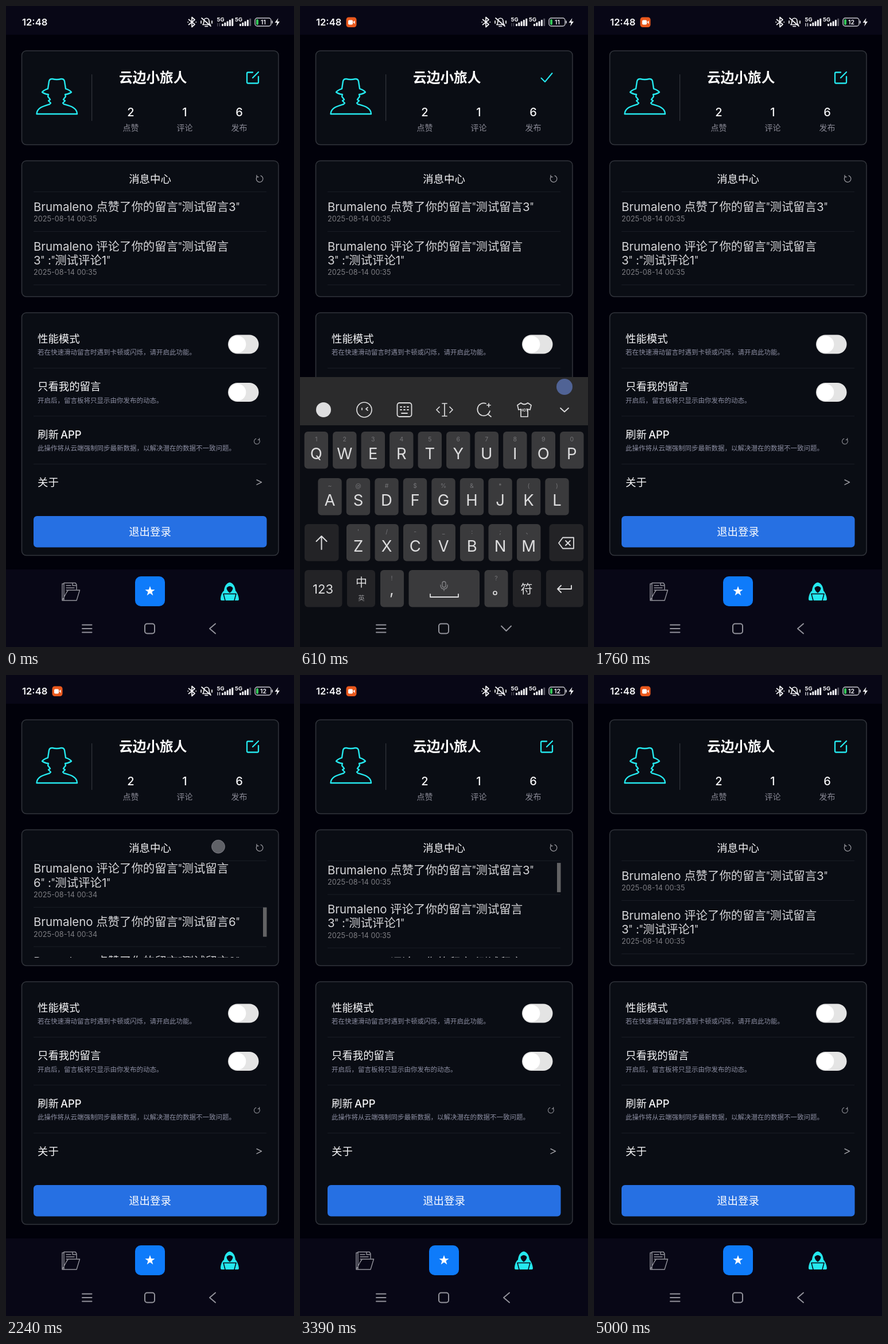
An HTML page that plays this animation: 502x1116 px, repeating every 5030 ms.

```html
<!DOCTYPE html>
<html lang="zh">
<head>
<meta charset="utf-8">
<style>
html, body { margin: 0; width: 100%; height: 100%; overflow: hidden; background: #01010a; }
svg { display: block; font-family: Inter, "Noto Sans CJK SC", "Noto Sans CJK", sans-serif; }
.q { font-family: Roboto, sans-serif; }
.line { fill: none; stroke-linecap: round; stroke-linejoin: round; }
</style>
</head>
<body>
<svg id="stage" width="502" height="1116" viewBox="0 0 502 1116"></svg>
<script>
const LOOP = 5030, LIST_TOP = 324, VIEW = 167, CONTENT = 553;
const CYAN = '#25e8ee', GRAY = '#93939b', WHITE = '#f6f6f8', RULE = '#191d25';
const USER = 'Brumaleno';

const rect = (x, y, w, h, r, fill, more = '') =>
  `<rect x="${x}" y="${y}" width="${w}" height="${h}" rx="${r}" fill="${fill}" ${more}/>`;
const line = (d, color, w = 1.5, more = '') =>
  `<path class="line" d="${d}" stroke="${color}" stroke-width="${w}" ${more}/>`;
const circle = (x, y, r, fill, more = '') => `<circle cx="${x}" cy="${y}" r="${r}" fill="${fill}" ${more}/>`;
const text = (x, y, size, s, fill, anchor = 'start', weight = 400) =>
  `<text x="${x}" y="${y}" font-size="${size}" fill="${fill}" text-anchor="${anchor}" font-weight="${weight}">${
    s.replace(/"/g, '<tspan class="q">"</tspan>')}</text>`;
const mid = (x, y, size, s, fill, weight) => text(x, y, size, s, fill, 'middle', weight);
const rule = y => rect(48, y, 406, 1, 0, RULE);
const card = (y, h) => rect(27.5, y, 447.5, h, 8, '#0a0d14', 'stroke="#32353c" stroke-width="1.5"');
const reload = (x, y, sx, sy) =>
  `<g transform="translate(${x} ${y}) scale(${sx} ${sy})">${
    line('M-4 -4.2A5.8 5.8 0 1 0 2 -5.6M-5 -6.5v3.2h3.2', '#9b9ba1', 1.2)}</g>`;

function signal(x, label, dimLast) {
  let s = mid(label, 27, 9.5, '5G', WHITE, 700);
  for (let i = 0; i < 5; i++) {
    const h = 4 + i * 2.3;
    s += rect(x + i * 4.3, 35 - h, 3, h, 1, dimLast && i == 4 ? '#55555f' : WHITE);
  }
  return s;
}

function statusBar() {
  return rect(0, 0, 502, 50, 0, '#080716') +
    text(28, 34.3, 16.6, '12:48', WHITE, 'start', 600) +
    `<g id="rec">${rect(80.5, 19.5, 18, 17.5, 4.5, '#e9581d')}${rect(84, 24.5, 8, 8, 2, '#fff')}
      <path d="M92.5 28l3-2.5v6z" fill="#fff"/></g>` +
    line('M318.5 23.5l10.5 8.5-5 4.5V19.5l5 4.5-10.5 8.5M317 28h.5M331 28h.5', WHITE, 1.7) +
    line('M343 32.5h13c-2-2-2-4-2-6c0-7-9-7-9 0c0 2 0 4-2 6M347 35.5h4.5M341 21l16 14M340 26v4M359 26v4', WHITE, 1.7) +
    `<g id="data">${line('M369 30v5M372.5 35v-5', WHITE, 1.2)}</g>` +
    signal(376, 374, false) + signal(407, 405.5, true) +
    rect(434, 21, 28, 14, 4, 'none', 'stroke="#c9c9cf" stroke-width="1.4"') +
    rect(436, 23, 4, 10, 2, '#35c759') + rect(463.3, 25.5, 1.7, 5, .8, '#c9c9cf') +
    `<text id="battery" x="448.5" y="32" font-size="10.5" font-weight="600" fill="${WHITE}" text-anchor="middle"></text>` +
    `<path d="M474.5 21l-6 8h4l-1.5 6.5 6-8.5h-4z" fill="${WHITE}"/>`;
}

function profile() {
  const stats = [[217.5, '2', '点赞'], [311.5, '1', '评论'], [406.5, '6', '发布']];
  return card(78, 163.5) +
    line(`M63 150C66 146 70 145 73 144L75 131Q76 126.5 81 127Q88.5 129 96 127Q101 126.5 102 131L104 144
      C107 145 111 146 114 150C111 152.5 107 153.5 103 154Q105 158 102 160L100 163L103 165L99 169L101 171
      C112 174 124 177 124 188H53.5C53.5 177 66 174 76 171L78 169L74 165L77 163L75 160Q72 158 74 154
      C70 153.5 66 152.5 63 150Z`, CYAN, 2.4) +
    rect(149, 119, 1.2, 81, 0, '#33363d') +
    text(197, 132.6, 23.7, '云边小旅人', '#fff', 'start', 700) +
    stats.map(([x, n, name]) => mid(x, 192, 20, n, WHITE, 500) + mid(x, 216.5, 14, name, '#898995')).join('') +
    `<g id="edit">${line('M430 115.5h-8q-2 0-2 2v15q0 2 2 2h16q2 0 2-2V123M430 125L440 115', CYAN, 2.3)}</g>` +
    `<g id="check">${line('M420.5 125.5L427 132L439.5 117', CYAN, 2)}</g>`;
}

function messages() {
  // [is comment, message number, minute]; comments take two lines
  const items = [[0, 3, 35], [1, 3, 35], [1, 4, 34], [1, 6, 34], [0, 6, 34], [0, 2, 34], [0, 4, 34]];
  let y = LIST_TOP, s = '';
  for (const [comment, n, minute] of items) {
    const head = `${USER} ${comment ? '评论' : '点赞'}了你的留言"测试留言`;
    s += text(48, y + 33, 20.4, comment ? head : `${head}${n}"`, '#d6d6d9');
    if (comment) s += text(48, y + 57.3, 20.4, `${n}" :"测试评论1"`, '#d6d6d9');
    y += comment ? 93 : 68.5;
    s += text(48, y - 17.4, 12.7, `2025-08-14 00:${minute}`, '#7d7d82') + rule(y - .5);
  }
  return card(269.5, 236.5) + mid(251, 307.5, 18.4, '消息中心', WHITE, 500) + reload(442, 301, 1, 1) + rule(323) +
    `<clipPath id="view"><rect x="28" y="${LIST_TOP}" width="446" height="168"/></clipPath>
    <g clip-path="url(#view)"><g id="list">${s}</g></g>` +
    rect(448, 0, 6.5, 51, 0, '#626264', 'id="thumb"');
}

function settings() {
  const rows = [['性能模式', '若在快速滑动留言时遇到卡顿或闪烁，请开启此功能。'],
    ['只看我的留言', '开启后，留言板将只显示由你发布的动态。'],
    ['刷新\u2009APP', '此操作将从云端强制同步最新数据，以解决潜在的数据不一致问题。'], ['关于', '']];
  const toggle = (y, id) => rect(387, y - 16.5, 53.5, 33, 16.5, '#e4e4e4', `id="track${id}"`) +
    circle(403.5, y, 14.8, '#fff', `id="knob${id}"`);
  return card(534, 422.5) +
    rows.map(([a, b], i) => {
      const y = i * 83.5;
      return text(55, y + 585.5, 18.4, a, WHITE, 'start', 500) + text(55, y + 607, 11.5, b, '#8c8ea2') +
        (i < 3 ? rule(y + 630) : '');
    }).join('') +
    toggle(589, 1) + toggle(672.5, 2) + reload(437.5, 758, -.85, .85) +
    line('M437 825l8.5 4.2-8.5 4.2', '#a0a0a6', 1.4) +
    rect(48, 888, 406.5, 54.5, 6, '#2670e3') + mid(251, 921.5, 18.4, '退出登录', '#fff', 500);
}

function tabBar() {
  const bar = '#080716';
  let star = '';
  for (let i = 0; i < 10; i++) {
    const r = i % 2 ? 3.6 : 9, a = i * Math.PI / 5;
    star += `${251 + r * Math.sin(a)},${1019 - r * Math.cos(a)} `;
  }
  return rect(0, 981, 502, 135, 0, bar) +
    line('M98 1035V1006h3M101 1035V1004.5h20l2 3v8M98 1035h25l5.5-18h-20l-3 4-7.5 14M105 1009h8M105 1013h14M105 1017h3M116 1005v4h6', GRAY, 1.4) +
    rect(225, 993, 52, 52, 10, '#0e7bfa') + `<polygon points="${star}" fill="#fff"/>` +
    `<path d="M390 1003.5C383 1005 380.500 1012 380 1018C376 1021 374 1027 374 1033Q374 1035 376 1035H404
      Q406 1035 406 1033C405.500 1027 403 1021 400 1018C399.500 1012 397 1005 390 1003.5Z" fill="${CYAN}"/>
    <path d="M384.5 1013Q390 1007 395.5 1013Q395 1019 390 1022Q385 1019 384.5 1013Z" fill="${bar}"/>` +
    line('M382 1035L379 1023.5H401L398 1035', bar, 1.5);
}

function keyboard() {
  const ink = '#dededf', mark = '#747477';
  const key = (x, y, w, dark) => rect(x, y, w, 64.5, 6, dark ? '#232326' : '#3a3a3c');
  const rows = [['QWERTYUIOP', '1234567890', 28.3, 741], ['ASDFGHJKL', '~@#$%&*()', 52, 822], ['ZXCVBNM', "'/-_:;、", 101.7, 902]];
  let s = rect(0, 646, 502, 470, 0, '#0b0d13') + rect(0, 646, 502, 84, 0, '#2b2b2c') + circle(461, 663, 14, '#506395');
  s += circle(41, 703, 13, ink) +
    line('M125 703a13 13 0 1 1-26 0a13 13 0 1 1 26 0M108 700v3M118 699l-3 2.5 3 2.5', ink, 1.7) +
    rect(169.5, 691, 25, 24, 4, 'none', `stroke="${ink}" stroke-width="1.8"`) +
    line('M175 698h2M181 698h2M187 698h2M175 703h2M181 703h2M187 703h2M177 709h10', ink, 1.8) +
    line('M243 698l-5 5 5 5M261 698l5 5-5 5M248 692h8M252 692v22M248 714h8', ink, 1.7) +
    line('M324 692a11 11 0 1 0 7 13M328 711l5 4M329 692v6M326 695h6', ink, 1.7) +
    line('M385 691q6 5 12 0l6 4-2 8-4-1v13h-12v-13l-4 1-2-8z', ink, 1.7) + mid(391, 706, 6, 'HOT', ink, 700) +
    line('M454 700l7 6.5 7-6.5', ink, 1.8);
  for (const [letters, marks, x0, y] of rows)
    [...letters].forEach((c, i) => {
      const x = x0 + i * 49.5;
      s += key(x - 20.7, y, 41.4) + mid(x, y + 17, 10.5, marks[i].replace('&', '&amp;'), mark) + mid(x, y + 47.5, 27.5, c, ink);
    });
  return s + key(8, 902, 59.5, 1) + line('M37.5 946v-22M28.5 932l9-9 9 9', ink, 2) +
    key(434.5, 902, 59.5, 1) + line('M451 935l7-9.5h19v19h-19zM463 931l8 8M471 931l-8 8', ink, 1.8) +
    key(8, 982, 65.5, 1) + mid(40, 1023, 22, '123', ink) +
    key(82, 982, 49, 1) + mid(107, 1011, 20, '中', ink) + mid(107, 1035, 11.5, '英', '#8e8e92') +
    key(140, 982, 41) + mid(160, 1000, 10.5, '!', mark) + mid(160, 1025, 27, ',', ink) +
    key(189.5, 982, 123.5) + rect(248, 1002, 6, 10, 3, 'none', 'stroke="#858588" stroke-width="1.3"') +
    line('M245 1008q0 7 6 7q6 0 6-7M251 1015v3', '#858588', 1.3) + line('M227 1024v5h49v-5', ink, 1.8) +
    key(321.5, 982, 41) + mid(342, 1000, 10.5, '?', mark) + circle(340, 1022, 3, 'none', `stroke="${ink}" stroke-width="1.7"`) +
    key(371, 982, 49, 1) + mid(395, 1022, 21, '符', ink) +
    key(429, 982, 65, 1) + line('M473 1009v6h-24M455 1009l-6 6 6 6', ink, 1.9);
}

const navBar = () => line('M133 1077.5h16.5M133 1084h16.5M133 1090.5h16.5', GRAY, 2) +
  rect(242, 1075.5, 17, 17, 4, 'none', `stroke="${GRAY}" stroke-width="2"`) +
  line('', GRAY, 2, 'id="back"');

const $ = id => document.getElementById(id);
$('stage').innerHTML = rect(0, 0, 502, 1116, 0, '#01010a') + statusBar() + profile() + messages() + settings() + tabBar() +
  `<g id="keys">${keyboard()}</g>` + navBar() +
  circle(0, 0, 11.5, '#acacb2', 'id="touch" fill-opacity=".53" stroke="#9a9aa2" stroke-opacity=".6"');

const ramp = (t, a, b) => Math.max(0, Math.min(1, (t - a) / (b - a)));
const smooth = (t, a, b) => { const u = ramp(t, a, b); return u * u * (3 - 2 * u); };
const out = (t, a, b) => 1 - (1 - ramp(t, a, b)) ** 2;
const fade = (id, v) => $(id).setAttribute('opacity', +v);

// [start, end, x, y from, y to]
const touches = [[90, 180, 430, 125, 125], [1420, 1500, 430, 125, 125], [1800, 1980, 372, 455, 340],
  [2080, 2260, 370, 445, 281.5], [3080, 3200, 370, 340, 465], [3840, 3940, 420, 677, 677], [4430, 4510, 420, 677, 677]];

function draw(t) {
  fade('rec', t >= 250);
  fade('data', t > 1100 && t < 2400 || t > 4600 ? 1 : .35);
  $('battery').textContent = t < 900 ? '11' : '12';

  const editing = t >= 180 && t < 1500;
  fade('edit', !editing);
  fade('check', editing);

  const up = smooth(t, 280, 550) - smooth(t, 800, 1080);
  $('keys').setAttribute('transform', `translate(0 ${470 * (1 - up)})`);
  $('back').setAttribute('d', up > .5 ? 'M351 1079.5l8.5 8.5 8.5-8.5' : 'M365 1075.5l-10 8.5 10 8.5');

  // two swipes up with a fling, then one swipe back
  const scroll = 145 * out(t, 1820, 2060) + 136.5 * ramp(t, 2080, 2260) + 104.5 * out(t, 2260, 2520) - 386 * out(t, 3090, 3450);
  $('list').setAttribute('transform', `translate(0 ${-scroll})`);
  $('thumb').setAttribute('y', LIST_TOP + scroll * VIEW / CONTENT);
  fade('thumb', ramp(t, 1810, 1840) - ramp(t, 2700, 2900) + ramp(t, 3090, 3110) - ramp(t, 3560, 3700));

  const on = t >= 3870 && t < 4510;
  $('track2').setAttribute('fill', on ? '#447fee' : '#e4e4e4');
  $('knob2').setAttribute('cx', 403.5 + 20.5 * (ramp(t, 3870, 4170) - ramp(t, 4510, 4760)));

  const hit = touches.find(([a, b]) => t >= a && t < b);
  fade('touch', !!hit);
  if (hit) {
    const [a, b, x, y0, y1] = hit;
    $('touch').setAttribute('cx', x);
    $('touch').setAttribute('cy', y0 + (y1 - y0) * ramp(t, a, b));
  }
}

function tick() {
  draw(performance.now() % LOOP);
  requestAnimationFrame(tick);
}
tick();
</script>
</body>
</html>
```
